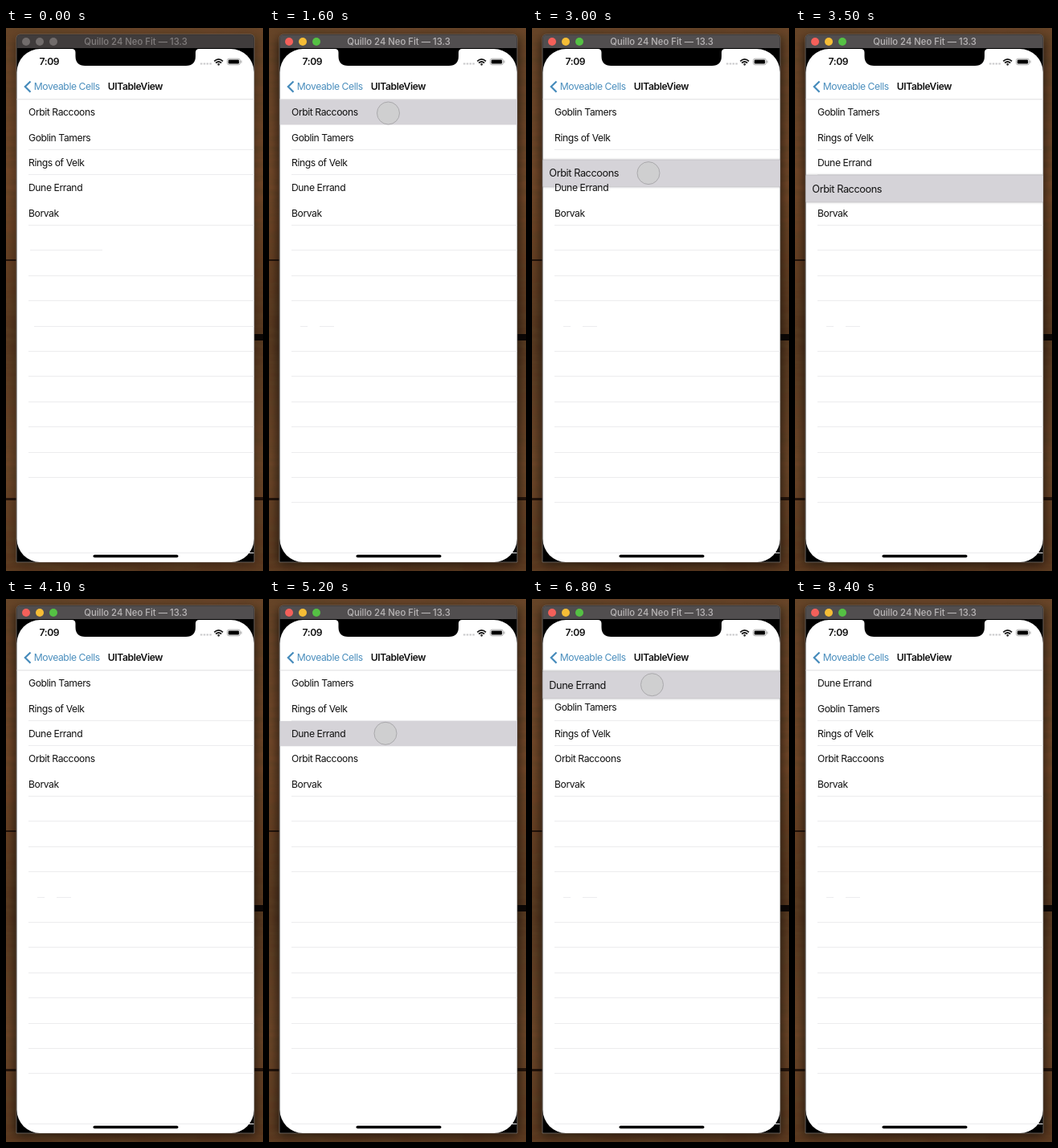
An HTML page that plays this animation: 320 px wide and 676 px high, repeating every 8.5 s.

```html
<!DOCTYPE html>
<html lang="en">
<head>
<meta charset="utf-8">
<title>Moveable Cells</title>
<style>
  html, body { margin: 0; width: 100%; height: 100%; overflow: hidden; background: #50341e; }
  svg { display: block; width: 100%; height: 100%; }
  text { font: 400 12.15px Inter, Roboto, sans-serif; letter-spacing: -.41px; fill: #111; }
  .bold { font-weight: 600; }
  .window-title { font-size: 11.3px; font-weight: 500; letter-spacing: 0; text-anchor: middle; }
  .line { stroke: #ececee; stroke-width: 1; }
</style>
</head>
<body>
<svg viewBox="0 0 320 676">
  <defs>
    <linearGradient id="wood" x2="0" y2="1">
      <stop offset="0" stop-color="#694529"/>
      <stop offset=".3" stop-color="#75492a"/>
      <stop offset=".42" stop-color="#684023"/>
      <stop offset=".57" stop-color="#583820"/>
      <stop offset=".8" stop-color="#70482a"/>
      <stop offset="1" stop-color="#5b381f"/>
    </linearGradient>
    <filter id="grain" x="0" y="0" width="1" height="1">
      <feTurbulence type="fractalNoise" baseFrequency=".025 .11" numOctaves="3" seed="8"/>
      <feColorMatrix values="0 0 0 0 .12  0 0 0 0 .06  0 0 0 0 .02  2.4 0 0 0 -.85"/>
    </filter>
    <filter id="windowBlur" x="-.1" y="-.1" width="1.2" height="1.2"><feGaussianBlur stdDeviation="7"/></filter>
    <filter id="cellBlur" x="-.1" y="-.5" width="1.2" height="2"><feGaussianBlur stdDeviation="1.5"/></filter>
    <clipPath id="table"><rect x="13.5" y="89" width="295.5" height="564"/></clipPath>
  </defs>

  <rect width="320" height="676" fill="url(#wood)"/>
  <rect width="320" height="676" filter="url(#grain)" opacity=".6"/>
  <path d="M309 381h11v8h-11z" fill="#0d0806"/>
  <path d="M0 585h14v3H0zM309 584h11v4h-11zM0 288h14v2H0z" fill="#24140b"/>
  <rect id="shadow" x="11" y="12" width="300" height="656" rx="6" filter="url(#windowBlur)"/>

  <path d="M13 665V13q0-5 5-5H304q5 0 5 5V665z" fill="#000" stroke="#77706b" stroke-width=".8"/>
  <path id="titleBar" d="M13.4 25V13q0-4.6 4.6-4.6H304q4.6 0 4.6 4.6V25z"/>
  <g id="buttons"><circle cx="25" cy="17" r="5"/><circle cx="42" cy="17" r="5"/><circle cx="59" cy="17" r="5"/></g>
  <text id="windowTitle" class="window-title" x="161.5" y="21">Quillo 24 Neo Fit — 13.3</text>

  <rect x="13.5" y="26" width="295.3" height="639" rx="29" fill="#fff"/>
  <path d="M82 26q4.500 0 4.500 4.500V35q0 12 12 12H224q12 0 12-12V30.500q0-4.500 4.500-4.500z"/>
  <text class="bold" x="41.5" y="46.200">7:09</text>
  <path d="M242 44.500h14" stroke="#c9c9cb" stroke-width="2" stroke-dasharray="2.500 1.300"/>
  <g fill="none" stroke="#111" stroke-width="1.700">
    <path d="M259.300 41.300q5.400-4.800 10.800 0M261.200 43.500q3.500-3 7 0"/>
    <circle cx="264.700" cy="45.300" r=".5"/>
  </g>
  <rect x="275.500" y="38.200" width="16" height="7.600" rx="2.300" fill="none" stroke="#999" stroke-width=".8"/>
  <rect x="276.800" y="39.500" width="13.400" height="5" rx="1.200"/>
  <path d="M293 40.500v3" stroke="#999"/>

  <path d="M30.500 66.500L23.800 73l6.700 6.800" fill="none" stroke="#468bbb" stroke-width="2.200"/>
  <text x="34.800" y="77.300" style="fill:#4a8ebd">Moveable Cells</text>
  <text class="bold" x="126.800" y="77.300">UITableView</text>
  <path d="M13.500 88.800H308.800" stroke="#dedee0"/>

  <g id="lines" class="line"></g>
  <g clip-path="url(#table)" id="rows"></g>
  <circle id="touch" r="14" fill="#cfcfd0" stroke="#aaa9ac"/>
  <rect x="108.500" y="655.800" width="106" height="3.400" rx="1.700"/>
</svg>

<script>
const LOOP = 8500, ROW = 31.4, FIRST = 104.8, ACTIVATE = 500;
const $ = id => document.getElementById(id);
const clamp = x => Math.max(0, Math.min(1, x));
const ease = x => { x = clamp(x); return x * x * (3 - 2 * x); };
const ramp = (t, start, length) => ease((t - start) / length);
const slotY = slot => FIRST + ROW * slot;

function track(t, keys) {
  if (t <= keys[0][0]) return keys[0][1];
  for (let i = 1; i < keys.length; i++) {
    const [t0, a] = keys[i - 1], [t1, b] = keys[i];
    if (t < t1) return a + (b - a) * (t - t0) / (t1 - t0);
  }
  return keys.at(-1)[1];
}

function add(parent, tag, attrs, content = '') {
  const node = document.createElementNS('http://www.w3.org/2000/svg', tag);
  for (const key in attrs) node.setAttribute(key, attrs[key]);
  node.textContent = content;
  return parent.appendChild(node);
}

// Each drag: touch down, lift, release, and the finger's path.
const firstDrag = {
  down: 1300, lift: 1900, drop: 3500,
  y: [[2000, slotY(0)], [2700, 178], [2900, 180.7], [3050, 181], [3250, 200], [3500, 200], [3700, slotY(3)]],
  x: [[2000, 148.5], [2900, 145]]
};
const secondDrag = {
  down: 4950, lift: 5450, drop: 7250,
  y: [[5550, slotY(2)], [5800, 165], [6000, 156.7], [6650, 107], [7250, 107], [7450, slotY(0)]],
  x: [[5550, 145], [6000, 145], [6700, 149.5]]
};
const drags = [firstDrag, secondDrag];

// Shifts are [time, slots] steps made to give way to a dragged row.
const rows = [
  { name: 'Orbit Raccoons', shifts: [], drag: firstDrag },
  { name: 'Goblin Tamers', shifts: [[2150, -1], [6540, 1]] },
  { name: 'Rings of Velk', shifts: [[2450, -1], [6080, 1]] },
  { name: 'Dune Errand', shifts: [[3080, -1]], drag: secondDrag },
  { name: 'Borvak', shifts: [] }
];

for (const row of rows) {
  row.group = add($('rows'), 'g', {});
  if (row.drag) {
    const box = { x: -148, y: -ROW / 2, width: 296, height: ROW };
    row.shade = add(row.group, 'rect', { ...box, fill: '#8c8a90', filter: 'url(#cellBlur)' });
    row.back = add(row.group, 'rect', { ...box, fill: '#d5d3d8' });
  }
  add(row.group, 'text', { x: -133.3, y: 4.3 }, row.name);
}
rows.filter(row => row.drag).forEach(row => $('rows').append(row.group));

const line = (slot, x1 = 28, x2 = 308.5) => {
  const y = Math.round(89 + ROW * slot) - .5;
  return add($('lines'), 'line', { x1, x2, y1: y, y2: y });
};
for (const slot of [2, 3, 5, 7, 8, 10, 11, 12, 13, 14, 15, 18]) line(slot);
const earlyLines = [line(6, 30, 120), line(9, 35)];
const lateLines = [line(6), line(16)];
const fragments = [line(9, 39, 48), line(9, 63, 81)];
const show = (nodes, on) => nodes.forEach(node => node.style.display = on ? '' : 'none');

function draw(t) {
  const active = t >= ACTIVATE;
  $('shadow').style.opacity = active ? .65 : .4;
  $('titleBar').style.fill = active ? '#514e4f' : '#403c3c';
  $('windowTitle').style.fill = active ? '#b9b6b7' : '#817d7d';
  [...$('buttons').children].forEach((dot, i) =>
    dot.style.fill = active ? ['#f4605a', '#f5bd36', '#55c144'][i] : '#716c6b');
  show(earlyLines, !active);
  show(lateLines, active);
  show(fragments, active && (t < 4700 || t > 6450));

  for (const { group, shifts, drag, shade, back } of rows) {
    let y = slotY(rows.findIndex(row => row.group === group));
    for (const [start, slots] of shifts) y += slots * ROW * ramp(t, start, 300);
    let lift = 0;
    if (drag) {
      if (t >= drag.y[0][0]) y = track(t, drag.y);
      const fade = 1 - ramp(t, drag.drop, 200);
      lift = ramp(t, drag.lift, 200) * fade;
      shade.style.opacity = lift;
      back.style.opacity = ramp(t, drag.down, 100) * fade;
    }
    group.setAttribute('transform', `translate(161.3 ${y}) scale(${1 + .05 * lift})`);
  }

  const held = drags.find(drag => t >= drag.down && t < drag.drop);
  show([$('touch')], held);
  if (held) {
    $('touch').setAttribute('cx', track(t, held.x));
    $('touch').setAttribute('cy', Math.max(106, track(t, held.y) - .3));
  }
}

function frame() {
  draw(performance.now() % LOOP);
  requestAnimationFrame(frame);
}
frame();
</script>
</body>
</html>
```
